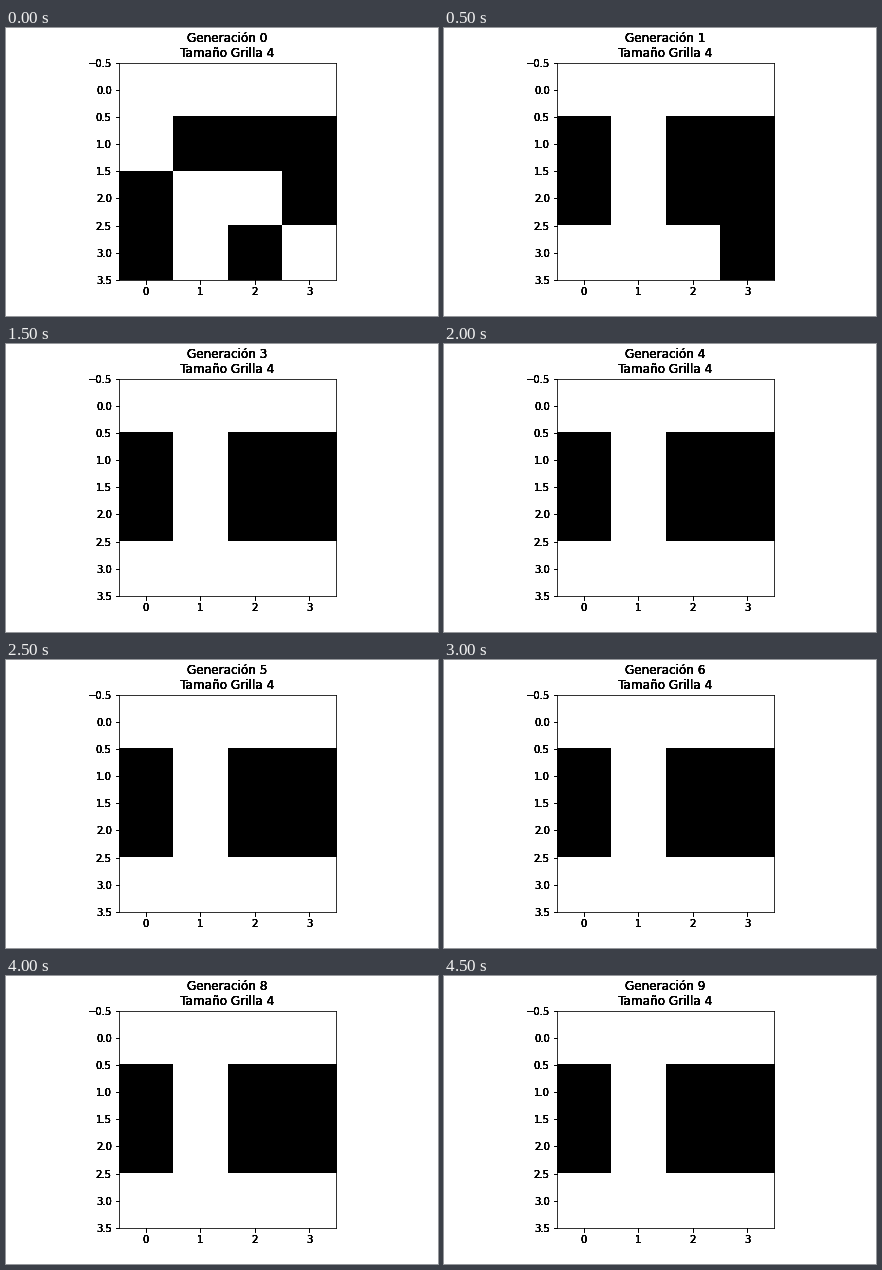
Write a matplotlib script that moves like this. It is 432 by 288 pixels and loops after 5000 ms.

```python
import matplotlib.pyplot as plt
import numpy as np
from matplotlib.animation import FuncAnimation

GENERATIONS = 10
SIZE = 4
PASSES = 6  # repeated drawing gives the text its hard, heavy edges

# 1 is a white cell, 0 a black one; the last state is stable
STATES = [
    ["1111", "1000", "0110", "0101"],
    ["1111", "0100", "0100", "1110"],
    ["1111", "0100", "0100", "1111"],
]


def grid(gen):
    rows = STATES[min(gen, len(STATES) - 1)]
    return np.array([[int(c) for c in row] for row in rows])


def heavy(artist):
    draw = artist.draw

    def repeat(renderer):
        for _ in range(PASSES):
            draw(renderer)

    artist.draw = repeat


plt.rcParams["font.family"] = "DejaVu Sans"
fig, ax = plt.subplots(figsize=(6, 4), dpi=72, facecolor="white")
fig.subplots_adjust(left=0.125, right=0.9, bottom=0.125, top=0.88)

image = ax.imshow(grid(0), cmap="gray", vmin=0, vmax=1, interpolation="nearest")
ax.set_xticks(range(SIZE))
ax.set_yticks(np.arange(-0.5, SIZE, 0.5))
title = ax.set_title("", fontsize=12)
for part in (ax.xaxis, ax.yaxis, title):
    heavy(part)


def update(gen):
    image.set_data(grid(gen))
    title.set_text(f"Generación {gen}\nTamaño Grilla {SIZE}")
    return image, title


anim = FuncAnimation(fig, update, frames=GENERATIONS, interval=500,
                     repeat=True, repeat_delay=0)
plt.show()
```
